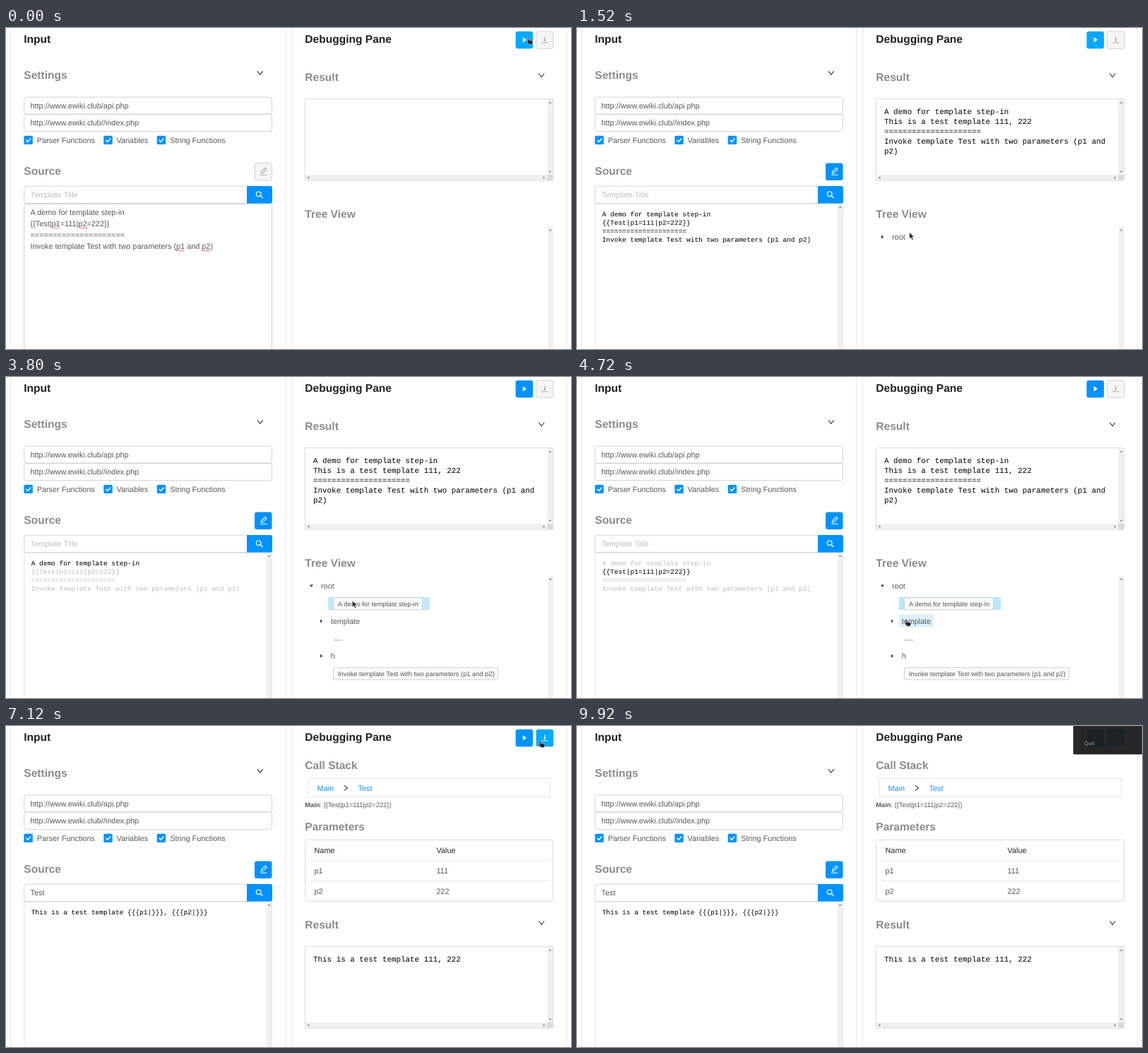
An HTML page for the animation above (10 s loop, 800 by 455 pixels).

```html
<!DOCTYPE html>
<html lang="en">
<head>
<meta charset="utf-8">
<title>Template debugger</title>
<style>
html, body { margin: 0; width: 100%; height: 100%; overflow: hidden; background: #fefefe; }
svg { display: block; width: 100vw; height: 100vh; }
text { font: 10.89px "Liberation Sans", Arial, sans-serif; fill: #595959; text-rendering: geometricPrecision; white-space: pre; }
.title { font-size: 15.56px; font-weight: bold; fill: #222; }
.head { font-size: 15.56px; font-weight: bold; fill: #8c8c8c; }
.small { font-size: 9.33px; }
.dark { fill: #262626; }
.hint { fill: #bfbfbf; }
.link { fill: #1890f5; }
.code { font: 9.48px "Liberation Mono", monospace; fill: #000; }
.out { font: 10.89px "Liberation Mono", monospace; fill: #000; }
.quit { font: 7.2px "Noto Sans", sans-serif; fill: #a8a8a8; }
</style>
</head>
<body>
<svg id="stage" viewBox="0 0 800 455" preserveAspectRatio="none"></svg>
<script>
const LOOP = 10000, TICK = 40;
const BLUE = [0, 146, 255], BRIGHT = [0, 170, 255], OFF = [245, 245, 245];
const stage = document.getElementById('stage');

// Markup helpers
const text = (x, y, s, cls = '', id = '') => `<text x="${x}" y="${y}" class="${cls}" id="${id}">${s}</text>`;
const box = (x, y, w, h, extra = '') => `<rect x="${x}" y="${y}" width="${w}" height="${h}" ${extra}/>`;
const frame = (x, y, w, h, color = '#d4d4d4', r = 3) =>
  box(x, y, w, h, `rx="${r}" fill="none" stroke="${color}"`);
const path = (d, extra) => `<path d="${d}" ${extra}/>`;
const line = (d, color, w = 1) => path(d, `fill="none" stroke="${color}" stroke-width="${w}"`);
const group = (id, body, extra = '') => `<g id="${id}" ${extra}>${body}</g>`;
const rows = (x, y, step, list, cls, id) =>
  list.map((s, i) => text(x, y + i * step, s, cls, id + i)).join('');

const chevron = y => line(`M754.3 ${y - 2.5}l3.9 5 3.9-5`, '#333', 1.1);
const tri = (x, y, turn) =>
  path('M-2-1.3H2L0 1.3Z', `fill="#888" transform="translate(${x} ${y}) rotate(${turn})"`);
const button = (id, x, y) =>
  box(x, y, 24.5, 24.5, `id="${id}" rx="3"`);
const wave = (id, x) =>
  box(x, 5, 24.5, 24.5, `id="${id}" rx="3" fill="none" stroke="#1890ff"`);
const squiggle = (x, y) =>
  line(`M${x} ${y}` + 'q1-1.8 2 0t2 0'.repeat(3), '#e03a3a', 0.8);

function checkbox(x, label, labelX) {
  return box(x, 152.7, 12.4, 12.4, 'rx="1.6" fill="#0092ff"') +
    line(`M${x + 3} 158.8l2.5 2.6 4.2-5`, '#fff', 1.5) + text(labelX, 162.8, label);
}

function resultPane(dy, body) {
  return `<g transform="translate(0 ${dy})">` +
    text(423.3, 75, 'Result', 'head') + chevron(67) +
    box(766.5, 101, 8, 107, 'fill="#f0f0f0"') + box(424, 208, 343, 8, 'fill="#f0f0f0"') +
    box(766.5, 208, 8, 8, 'fill="#dadada"') +
    tri(770.5, 105.5, 180) + tri(770.5, 204, 0) + tri(428, 212, 90) + tri(762, 212, -90) +
    frame(423.5, 100.5, 351, 115.7, '#dedede', 0) + body + '</g>';
}

const chip = (y, w, s) =>
  box(463.5, y - 8.5, w, 17, 'rx="2" fill="#fafafa" stroke="#d0d0d0"') + text(470, y + 3.3, s, 'small');

const leftPane =
  line('M6.5 0V455M395.8 0V455M404.8 0V455M793.8 0V455', '#e6e6e6') +
  text(25.3, 20.8, 'Input', 'title') + text(25.3, 72, 'Settings', 'head') +
  line('M356 61.2l3.9 5 3.9-5', '#333', 1.1) +
  frame(25.7, 98, 350.8, 24) + frame(25.7, 122.4, 350.8, 24.2) +
  text(34.5, 113.9, 'http://www.ewiki.club/api.php') +
  text(34.5, 138.3, 'http://www.ewiki.club//index.php') +
  checkbox(25.4, 'Parser Functions', 43.7) + checkbox(138.3, 'Variables', 156.6) +
  checkbox(213.7, 'String Functions', 232.2) +
  text(25.3, 207.7, 'Source', 'head') + button('edit', 352, 191.4) +
  group('pen', line('M361.3 206l.4-2.4 5.4-5.4 2 2-5.4 5.4ZM360 208.3h9.6', 'currentColor', 1.1)) +
  frame(25.7, 224.2, 330, 24.3) +
  path('M341 224h33q3 0 3 3v18.7q0 3-3 3h-33Z', 'fill="#0092ff"') +
  '<circle cx="357.7" cy="235.3" r="3.3" fill="none" stroke="#fff" stroke-width="1.2"/>' +
  line('M360.1 237.7l3.4 3.3', '#fff', 1.3) +
  text(34.5, 240.3, 'Template Title', 'hint', 'name') +
  group('plain',
    frame(25.7, 249.3, 350.8, 230, '#cfcfcf') +
    rows(34.5, 264.8, 16.1, ['A demo for template step-in', '{{Test|p1=111|p2=222}}',
      '='.repeat(21), 'Invoke template Test with two parameters (p1 and p2)'], '', 'p') +
    squiggle(64.5, 283.3) + squiggle(104, 283.3) + squiggle(240, 315.3) + squiggle(277, 315.3)) +
  group('editor',
    box(368.7, 249.5, 8, 210, 'fill="#f0f0f0"') + tri(372.6, 253.5, 180) +
    frame(25.7, 249.3, 350.8, 230, '#e2e2e2', 0) +
    group('mainCode', rows(35.7, 267.4, 11.9, ['A demo for template step-in', '{{Test|p1=111|p2=222}}',
      '='.repeat(21), 'Invoke template Test with two parameters (p1 and p2)'], 'code', 'c')) +
    group('testCode', text(35.7, 267.4, 'This is a test template {{{p1|}}}, {{{p2|}}}', 'code')));

const treeView =
  resultPane(0, group('mainOut', rows(435, 122, 13.95, ['A demo for template step-in',
    'This is a test template 111, 222', '='.repeat(21),
    'Invoke template Test with two parameters (p1 and', 'p2)'], 'out', 'o'))) +
  text(423.3, 268.6, 'Tree View', 'head') +
  box(766.8, 282, 8, 173, 'fill="#f0f0f0"') + tri(770.8, 286.3, 180) +
  group('tree',
    path('M-2.6-1.6H2.6L0 1.9Z', 'id="caret" fill="#444"') + text(446, 299.8, 'root') +
    '<clipPath id="fold"><rect id="foldBox" x="424" y="306" width="342" height="0"/></clipPath>' +
    group('nodes',
      box(456, 312, 144, 18.3, 'id="demoBg"') + chip(321.4, 126, 'A demo for template step-in') +
      box(456, 336.5, 49.3, 18.2, 'id="tplBg"') + text(459.7, 349.5, 'template') +
      path('M445 343.4v5.2l3.3-2.6ZM445 392.8v5.2l3.3-2.6Z', 'fill="#444"') +
      box(464, 372, 12, 1.9, 'fill="#d0d0d0"') + text(459.7, 399, 'h') +
      chip(420.4, 233, 'Invoke template Test with two parameters (p1 and p2)'),
      'clip-path="url(#fold)"'));

const stackView =
  text(423.3, 61, 'Call Stack', 'head') + frame(427.7, 74.5, 343, 25.7, '#e6e6e6', 0) +
  text(440.5, 91.7, 'Main', 'link') + line('M478.7 84.2l5 3.6-5 3.6', '#444', 1.1) +
  text(498.5, 91.7, 'Test', 'link') +
  text(423.3, 115, '<tspan font-weight="bold">Main</tspan>: {{Test|p1=111|p2=222}}', 'small') +
  text(423.3, 147.8, 'Parameters', 'head') + frame(423.7, 161.5, 351, 86.8, '#dcdcdc') +
  box(431, 191, 337, 28.5, 'id="row1" fill="#e6f7ff"') + box(431, 220, 337, 28, 'id="row2" fill="#e6f7ff"') +
  line('M431 190.7H768M431 219.6H768', '#e8e8e8') +
  text(436.5, 180, 'Name', 'dark') + text(609.5, 180, 'Value', 'dark') +
  text(436.5, 209, 'p1') + text(609.5, 209, '111') +
  text(436.5, 237.9, 'p2') + text(609.5, 237.9, '222') +
  resultPane(212, group('testOut', text(435, 122, 'This is a test template 111, 222', 'out')));

const overlay =
  text(423.3, 20.8, 'Debugging Pane', 'title') +
  wave('runWave', 721.6) + wave('stepWave', 750.6) +
  button('run', 721.6, 4.8) + path('M731.8 13v7.6l5.2-3.8Z', 'fill="#fff"') +
  button('step', 750.6, 4.8) +
  group('stepIcon', line('M762.8 12.3v6M758.3 20.8h9', 'currentColor', 1.1) +
    path('M760.9 16.6h3.8l-1.9 2.6Z', 'fill="currentColor"')) +
  group('cursor',
    path('M0 0v9.2l2.1-1.9 1.6 3.5 1.7-.8-1.6-3.4h2.9Z', 'id="arrow" fill="#222" stroke="#fff" stroke-width=".6"') +
    path('M1.2 0q1 0 1 1v3q3.6.2 5.2 1.2.8.5.6 2L7.2 10.3H2.5L-.8 6.5q.2-1.2 1.2-.4V1q0-1 .8-1Z',
      'id="hand" fill="#262626" stroke="#fff" stroke-width=".5"')) +
  group('menu', path('M702.6 0H800V40.3H705.2q-2.6 0-2.6-2.6Z', 'fill="#1c1c1c" fill-opacity=".95"') +
    text(718.3, 27, 'Quit', 'quit'));

stage.innerHTML = leftPane + group('treeView', treeView) + group('stackView', stackView) + overlay;

// Motion helpers
const el = {};
stage.querySelectorAll('[id]').forEach(n => { if (n.id) el[n.id] = n; });
const set = (id, name, value) => el[id].setAttribute(name, value);
const show = (id, on) => set(id, 'visibility', on ? 'inherit' : 'hidden');
const ramp = (t, from, to) => Math.min(1, Math.max(0, (t - from) / (to - from)));
const ease = k => k * k * (3 - 2 * k);
const mix = (a, b, k) => `rgb(${a.map((v, i) => Math.round(v + (b[i] - v) * k))})`;

const track = [
  [0, 738, 13], [1300, 738, 13], [1520, 470.7, 289.7], [1700, 452, 293], [1960, 431.5, 294],
  [2440, 431.5, 294], [2800, 490.3, 317], [4080, 490.3, 317], [4480, 464.8, 343],
  [4800, 464.8, 343], [5120, 722, 84], [5380, 722, 84], [5920, 762.5, 14.5],
  [7100, 762.5, 14.5], [7200, 690, 70], [7380, 690, 70], [7720, 600, 202], [8080, 596, 234]
];

function cursorAt(t) {
  const i = track.findIndex(p => p[0] > t);
  if (i < 0) return track[track.length - 1].slice(1);
  const [t0, x0, y0] = track[i - 1], [t1, x1, y1] = track[i];
  const k = ease(ramp(t, t0, t1));
  return [x0 + (x1 - x0) * k, y0 + (y1 - y0) * k];
}

function ring(id, x, k) {
  const grow = 3 * ease(k);
  set(id, 'x', x - grow / 2);
  set(id, 'y', 4.8 - grow / 2);
  set(id, 'width', 24.5 + grow);
  set(id, 'height', 24.5 + grow);
  set(id, 'stroke-width', grow);
  set(id, 'opacity', 0.35 * (1 - k));
}

function draw(t) {
  const ran = t >= 640, stepped = t >= 6680, picked = t >= 4720, selected = t >= 3600;

  show('plain', !ran);
  show('editor', ran);
  show('mainCode', ran && !stepped);
  show('testCode', stepped);
  show('mainOut', ran && !stepped);
  show('tree', ran && !stepped);
  show('treeView', !stepped);
  show('stackView', stepped);
  show('testOut', t >= 7120);
  el.name.textContent = stepped ? 'Test' : 'Template Title';
  el.name.setAttribute('class', stepped ? '' : 'hint');

  const edit = ramp(t, 640, 880);
  set('edit', 'fill', mix(OFF, BLUE, edit));
  set('edit', 'stroke', edit ? 'none' : '#d4d4d4');
  set('pen', 'color', edit ? '#fff' : '#aaa');
  set('run', 'fill', mix(BRIGHT, BLUE, ramp(t, 2120, 2320)));
  const on = ramp(t, 4760, 5040), hover = ramp(t, 5800, 5920);
  set('step', 'fill', hover ? mix(BLUE, BRIGHT, hover) : mix(OFF, BLUE, on));
  set('step', 'stroke', on ? 'none' : '#d4d4d4');
  set('stepIcon', 'color', on ? '#fff' : '#aaa');
  ring('runWave', 721.6, ramp(t, 480, 1080));
  ring('stepWave', 750.6, ramp(t, 6080, 6640));

  const active = picked ? 1 : 0;
  for (let i = 0; i < 4; i++) {
    el['c' + i].style.fill = selected && i !== active ? '#bfbfbf' : '#000';
  }

  const open = ease(ramp(t, 2180, 2420));
  set('caret', 'transform', `translate(432.5 296.2) rotate(${-90 * (1 - open)})`);
  set('foldBox', 'height', 149 * open);
  set('nodes', 'opacity', open);
  const white = [254, 254, 254], pale = [230, 247, 255], strong = [186, 231, 255];
  set('demoBg', 'fill', picked ? mix(strong, white, ramp(t, 4720, 5000))
    : selected ? mix(pale, strong, ramp(t, 3560, 3840))
    : mix(white, pale, ramp(t, 2600, 2800)));
  set('tplBg', 'fill', picked ? mix([220, 241, 252], strong, ramp(t, 4720, 5000))
    : mix(white, pale, ramp(t, 4280, 4480)));

  const [x, y] = cursorAt(t);
  const hand = t < 1340 || (t >= 4360 && t < 4860) || (t >= 5840 && t < 7130);
  set('cursor', 'transform', `translate(${x} ${y})`);
  show('cursor', t < 8120);
  show('arrow', !hand);
  show('hand', hand);
  set('row1', 'opacity', ramp(t, 7600, 7720) * (1 - ramp(t, 7880, 8040)));
  set('row2', 'opacity', ramp(t, 7880, 8000) * (1 - ramp(t, 8000, 8120)));
  set('menu', 'opacity', ramp(t, 9060, 9320));
}

function loop(now) {
  const t = now % LOOP;
  draw(t - t % TICK);
  requestAnimationFrame(loop);
}
draw(0);
requestAnimationFrame(loop);
</script>
</body>
</html>
```
